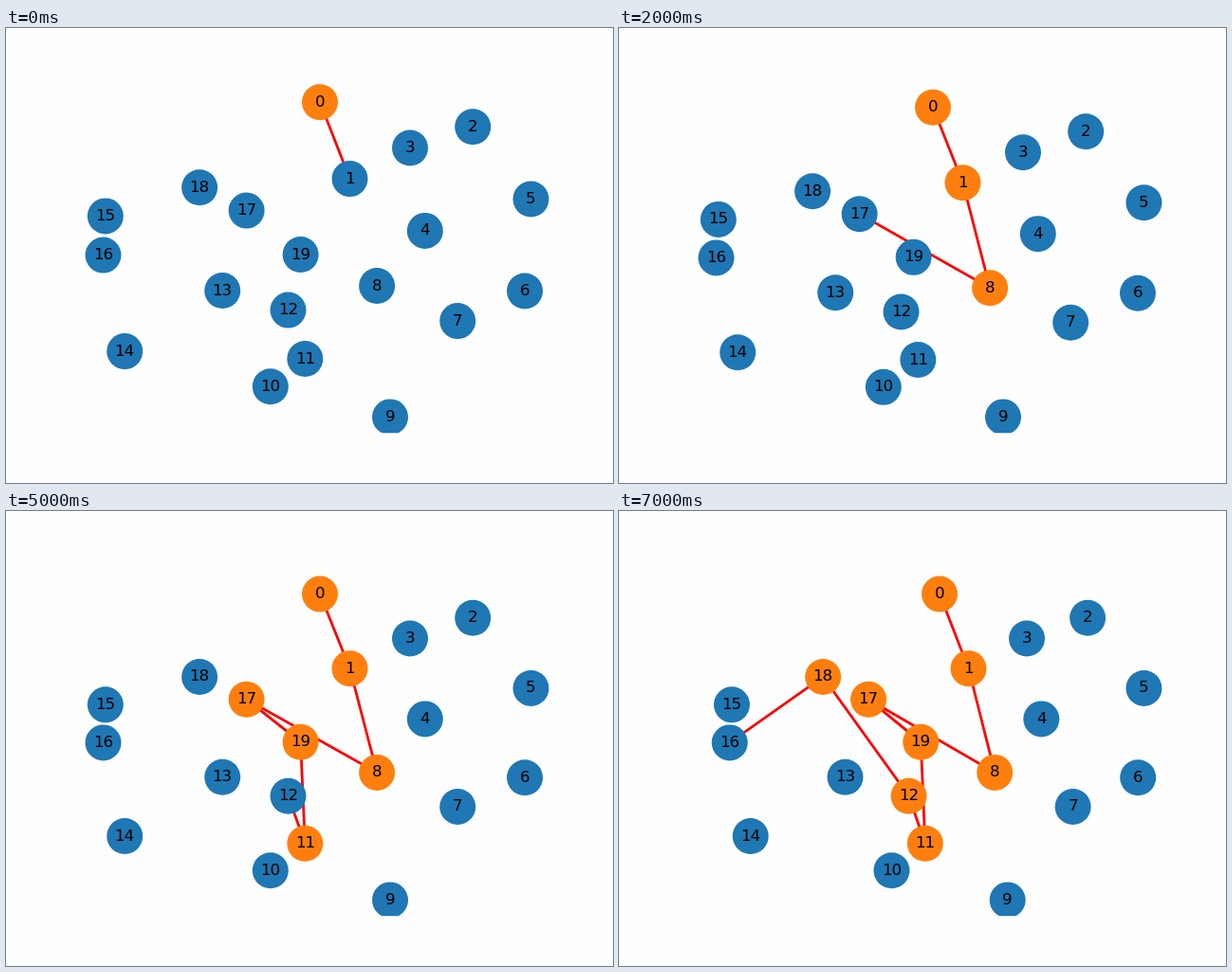
Animation of 640 by 480 pixels, one loop 8 s. Source, as an HTML page:

```html
<!DOCTYPE html>
<html lang="en">
<head>
<meta charset="utf-8">
<title>Path through a graph</title>
<style>
  html, body { margin: 0; width: 100%; height: 100%; overflow: hidden; background: #fefefe; }
  svg { display: block; width: 640px; height: 480px; }
  circle { fill: #1f77b4; }
  circle.seen { fill: #ff7f0e; }
  polyline { fill: none; stroke: #f00; stroke-width: 2.78; }
  text { font: 16.667px "DejaVu Sans", sans-serif; letter-spacing: -1px; fill: #000; }
</style>
</head>
<body>
<svg viewBox="0 0 640 480">
  <clipPath id="axes"><rect x="80" y="57.6" width="496" height="369.6"/></clipPath>
  <g id="edges" clip-path="url(#axes)"></g>
  <g id="nodes" clip-path="url(#axes)"></g>
  <g id="labels"></g>
</svg>
<script>
const STEP = 1000, RADIUS = 19, FONT = 16.667;
const RIGHT = 553.45, BOTTOM = 410.4;
const nodes = [
  [331, 78.3], [362.5, 159.1], [492.2, 104.2], [426, 126.5], [441.8, 213.9],
  [RIGHT, 180.5], [547, 277.5], [476.2, 309.1], [391.1, 272], [405, BOTTOM],
  [278.8, 378.3], [315.3, 349], [297.5, 297.6], [228.2, 277], [125.2, 341.1],
  [104.8, 198.4], [102.5, 239.6], [253.6, 192.6], [204.1, 168.2], [310.6, 239]
];
const route = [0, 1, 8, 17, 19, 11, 12, 18, 16];
const steps = route.length - 1;

function add(parent, tag, attrs = {}) {
  const el = document.createElementNS("http://www.w3.org/2000/svg", tag);
  for (const key in attrs) el.setAttribute(key, attrs[key]);
  return document.getElementById(parent).appendChild(el);
}

// Measured large, so that hinting does not round the metrics.
const pen = document.createElement("canvas").getContext("2d");
pen.font = '1000px "DejaVu Sans", sans-serif';
function measure(text) {
  const m = pen.measureText(text), k = FONT / 1000;
  return { half: m.width * k / 2, bearing: -m.actualBoundingBoxLeft * k };
}

const line = add("edges", "polyline");
const items = nodes.map(([x, y], i) => {
  const label = add("labels", "text");
  label.textContent = i;
  return { x, y, label, circle: add("nodes", "circle", { r: RADIUS }), ...measure(String(i)) };
});

// The axes zoom out twice in height and once in width.
const scaleX = step => step < 7 ? 1 : 0.9685;
const scaleY = step => step < 1 ? 1 : step < 4 ? 0.9835 : 0.972;

function show(step) {
  const seen = route.slice(0, step + 1);
  const points = items.map(({ x, y, label, circle, half, bearing }, i) => {
    const px = RIGHT + (x - RIGHT) * scaleX(step);
    const py = BOTTOM + (y - BOTTOM) * scaleY(step);
    circle.setAttribute("cx", px);
    circle.setAttribute("cy", py);
    circle.classList.toggle("seen", seen.includes(i));
    // The left edge of the ink sits on a whole pixel.
    label.setAttribute("x", Math.round(px - half + bearing) - Math.floor(bearing));
    label.setAttribute("y", Math.round(py + 4.5));
    return [px, py];
  });
  line.setAttribute("points", route.slice(0, step + 2).map(i => points[i]).join(" "));
}

const start = performance.now();
let current = -1;
function tick() {
  const step = Math.floor((performance.now() - start) / STEP) % steps;
  if (step !== current) show(current = step);
  requestAnimationFrame(tick);
}
tick();
</script>
</body>
</html>
```
